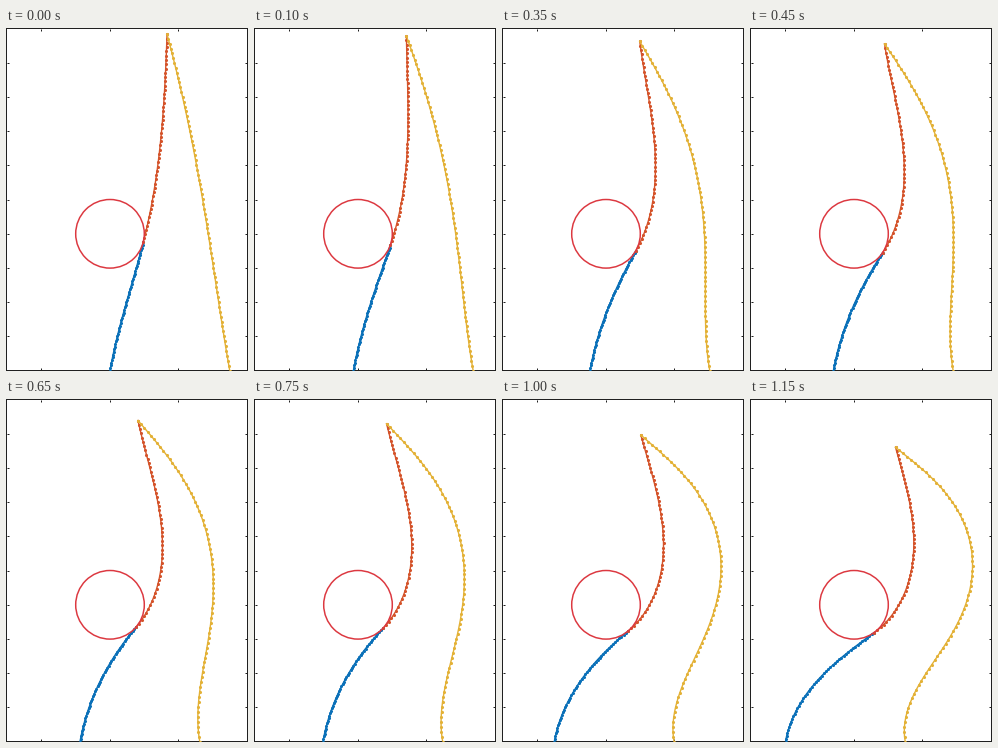
Animation of 242x343 px, one loop 1.2 s. Source, as a matplotlib script:

```python
import numpy as np
import matplotlib.pyplot as plt
from matplotlib.animation import FuncAnimation
from matplotlib.patches import Circle

W, H, DPI = 242, 343, 100
PX = 72 / DPI
FRAMES, STEP = 24, 50
BLUE, ORANGE, YELLOW = "#0A70B8", "#D4532A", "#E3B136"
RED, INK = "#DC3840", "#202020"

# Positions are complex numbers x + iy in pixels, y pointing down
CENTER, RADIUS = 104 + 205.8j, 34.3
FLOOR, FOOT_GAP, FOOT_LEAN = 342.5, 119.7, 10


def rod(start, end, lean_start, lean_end, nodes, skew=0):
    """Evenly spaced nodes of a bent rod; leans are degrees clockwise from up."""
    chord = np.degrees(np.angle(end - start)) + 90
    bow = 6 * (chord - (lean_start + lean_end) / 2) - skew / 2
    u = (np.arange(nodes - 1) + 0.5) / (nodes - 1)
    lean = lean_start + (lean_end - lean_start) * u + u * (1 - u) * (bow + skew * u)
    path = np.r_[0, np.cumsum(np.exp(1j * np.radians(lean - 90)))]
    return start + path * (end - start) / path[-1]


def rods(p):
    """Lower left, upper left and right rod at progress p from 0 to 1."""
    foot = 104 - 52.5 * p - 16 * p**7 + 1j * FLOOR
    q = p - 0.565
    tip = 132 + 80 * q**2 - 19.5 * q**3 + 1j * (6.3 + 20 * p + 12 * p**2 + 10 * p**8)
    angle = 14.5 + 54 * p - 14.5 * p**2
    contact = CENTER + RADIUS * np.exp(1j * np.radians(angle))
    left_lean = 2 - 18 * (1 - (1 - p)**2)
    right_lean = -15 - 58 * p + 23 * p**2
    return (
        rod(foot, contact, FOOT_LEAN, angle, 50),
        rod(contact, tip, angle, left_lean, 50),
        rod(foot + FOOT_GAP, tip, -FOOT_LEAN, right_lean, 70,
            skew=-10 - 350 * p - 130 * p**2),
    )


# The dark figure shows as a one-pixel border around the white axes
fig = plt.figure(figsize=(W / DPI, H / DPI), dpi=DPI, facecolor=INK)
ax = fig.add_axes([1 / W, 1 / H, 1 - 2 / W, 1 - 2 / H])
ax.set(xlim=(1, W - 1), ylim=(H - 1, 1),
       xticks=35.2 + 68.5 * np.arange(3), yticks=34.7 + 34.2 * np.arange(9))
ax.spines[:].set_visible(False)
ax.tick_params(direction="in", length=2.5 * PX, width=PX, color=INK, top=True,
               right=True, labelleft=False, labelbottom=False)

lines = []
for color in (BLUE, ORANGE, YELLOW):
    line, = ax.plot([], [], "o-", color=color, lw=1.4 * PX, ms=3.1 * PX, mew=0)
    line.set_snap(False)
    lines.append(line)
ax.add_patch(Circle((CENTER.real, CENTER.imag), RADIUS, fill=False, ec=RED,
                    lw=1.5 * PX, zorder=5))


def update(i):
    for line, path in zip(lines, rods(i / (FRAMES - 1))):
        line.set_data(path.real, path.imag)
    return lines


anim = FuncAnimation(fig, update, frames=FRAMES, interval=STEP, repeat=True,
                     repeat_delay=0, blit=False)
plt.show()
```
